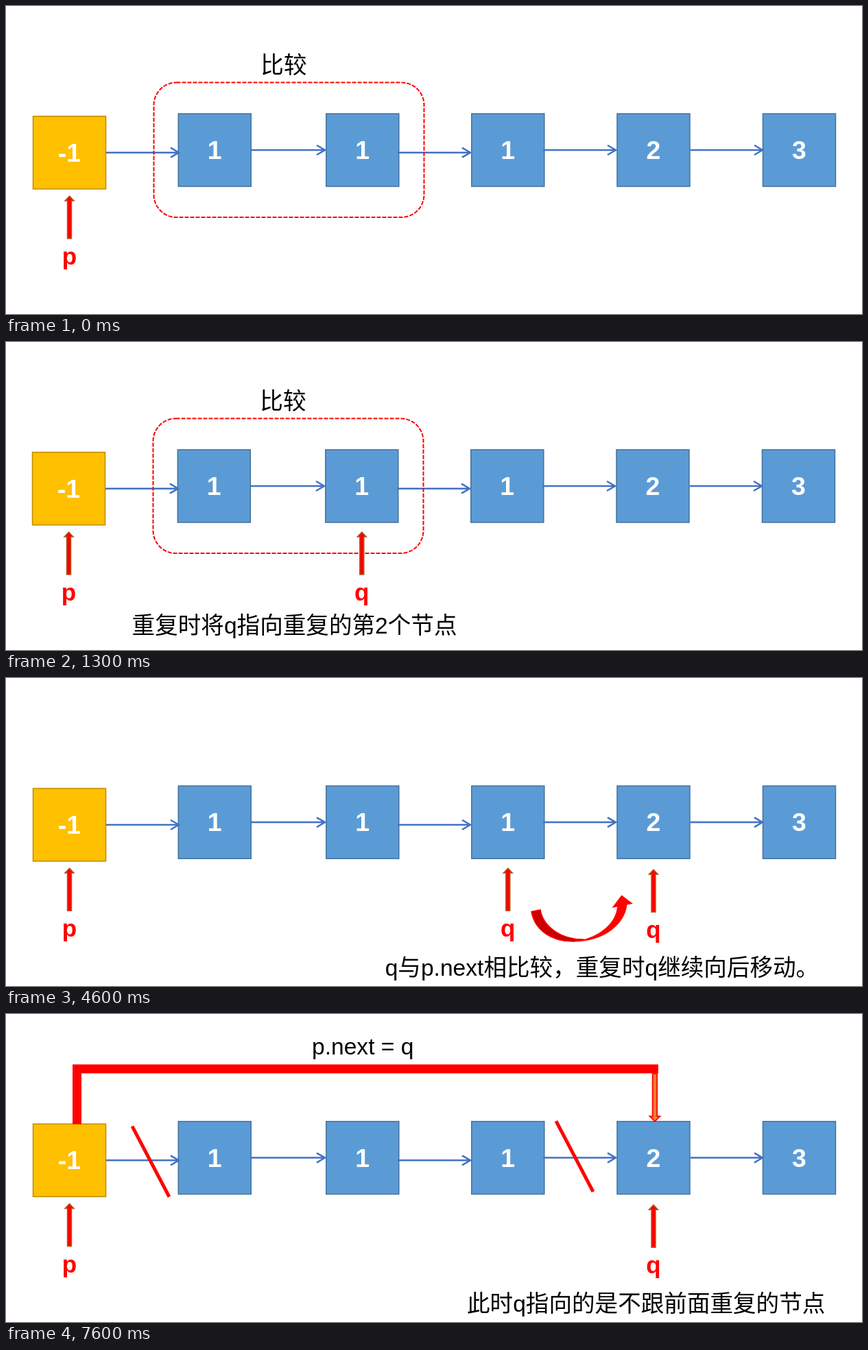
These frames come from a looping animation (1248 by 449 pixels, 8000 ms). An HTML page:

```html
<!DOCTYPE html>
<html lang="zh-CN">
<head>
<meta charset="utf-8">
<title>Linked list: remove duplicates</title>
<style>
  html, body { margin: 0; width: 100%; height: 100%; overflow: hidden; background: #fff; }
  svg { display: block; width: 100vw; height: 100vh; }
  text { font-family: "Liberation Sans", "Noto Sans CJK SC", "Noto Sans CJK", sans-serif; }
  .note { font-size: 33.6px; }
  .value { font-size: 37.5px; font-weight: bold; fill: #fff; text-anchor: middle; }
  .name { font-size: 35px; font-weight: bold; fill: #f00; text-anchor: middle; }
  .link { fill: none; stroke: #4472c4; stroke-width: 2.5; }
  .pointer { fill: #f00; stroke: #ae5a21; stroke-width: 1.5; }
  .frame { fill: none; stroke: #f00; stroke-width: 2; stroke-dasharray: 6 2; }
  .cut { stroke: #f00; stroke-width: 5; }
</style>
</head>
<body>
<svg id="stage" viewBox="0 0 1248 449" xmlns="http://www.w3.org/2000/svg"></svg>
<script>
const stage = document.getElementById('stage');
const LOOP = 8000;
const centers = [92.5, 304.3, 519.8, 731.8, 944, 1156.5];
const values = [-1, 1, 1, 1, 2, 3];

const note = (x, y, text) => `<text class="note" x="${x}" y="${y}">${text}</text>`;

function node(value, i) {
  const x = centers[i];
  const y = i ? 210 : 213.7;
  const [fill, edge] = i ? ['#5b9bd5', '#41719c'] : ['#ffc000', '#bc8c00'];
  return `<rect x="${x - 53}" y="${y - 53}" width="106" height="106"
      fill="${fill}" stroke="${edge}" stroke-width="1.5"/>
    <text class="value" x="${x}" y="${y + 13}">${value}</text>`;
}

const link = (x1, x2, y) =>
  `<path class="link" d="M${x1},${y}H${x2 - 1}M${x2 - 13},${y - 7}L${x2 - 1},${y}l-12,7"/>`;

// Upward block arrow with its label, under node i
function pointer(name, i, dy = 0) {
  return `<g transform="translate(${centers[i]} ${dy})">
    <path class="pointer" d="M0,277l6.5,7H3V339H-3V284H-6.5Z"/>
    <text class="name" x="0" y="377">${name}</text></g>`;
}

const swoop = (dx, dy) => `<g transform="translate(${dx} ${dy})">
  <path fill="#c00" stroke="#f00" stroke-width="1.5"
    d="M555.5,342C560,369 585,386 617,385.5L632,382.5C600,383 573,365 568.5,339.5Z"/>
  <path fill="#f00"
    d="M631,383C657,376 679,358 680.5,335L673,336.5L687,318L703.5,330.5L695,332C692,361 660,387 615,386Z"/></g>`;

const cut = (x, y) => `<path class="cut" d="M${x},${y}l54,103"/>`;

const list = values.map(node).join('') +
  link(146, 253, 213.7) + link(358, 466, 210) + link(571, 678, 213.7) +
  link(783, 890, 210) + link(998, 1104, 210) + pointer('p', 0);

const compare = '<rect class="frame" x="215.5" y="111.5" width="394" height="196.5" rx="33"/>' +
  note(371.3, 97.5, '比较');

const bypass = `<path d="M103.5,161V80.5H951" fill="none" stroke="#f00" stroke-width="13"/>
  <path d="M942.7,87.5h6.6V149.5h4.2L946,157l-7.5,-7.5h4.2Z"
    fill="#ed7d31" stroke="#f00" stroke-width="1.8"/>`;

const scenes = [
  { from: 0, dx: 0, dy: 0, art: compare },
  { from: 100, dx: -1, dy: 0,
    art: compare + pointer('q', 2) + note(184.6, 425, '重复时将q指向重复的第2个节点') },
  { from: 2100, dx: 0, dy: 0.3,
    art: pointer('q', 2) + pointer('q', 3) + swoop(0, 0) +
      note(446.7, 441, 'q与p.next相比较，重复时q向后移动。') },
  { from: 4600, dx: 0, dy: 0.3,
    art: pointer('q', 3) + pointer('q', 4, 2) + swoop(210.5, -1.8) +
      note(552.7, 433.5, 'q与p.next相比较，重复时q继续向后移动。') },
  { from: 7600, dx: 0, dy: -0.4,
    art: pointer('q', 4, 1.7) + bypass + cut(184, 164) + cut(802, 156.5) +
      note(446, 59.5, 'p.next = q') +
      note(672, 434.5, '此时q指向的是不跟前面重复的节点') }
];

stage.innerHTML = scenes.map(s =>
  `<g visibility="hidden" transform="translate(${s.dx} ${s.dy})">${list}${s.art}</g>`).join('');
const layers = [...stage.children];

function draw(time) {
  const t = time % LOOP;
  const active = scenes.filter(s => s.from <= t).length - 1;
  layers.forEach((g, i) => g.setAttribute('visibility', i === active ? 'visible' : 'hidden'));
}

const start = performance.now();
function tick() {
  draw(performance.now() - start);
  requestAnimationFrame(tick);
}
tick();
</script>
</body>
</html>
```
